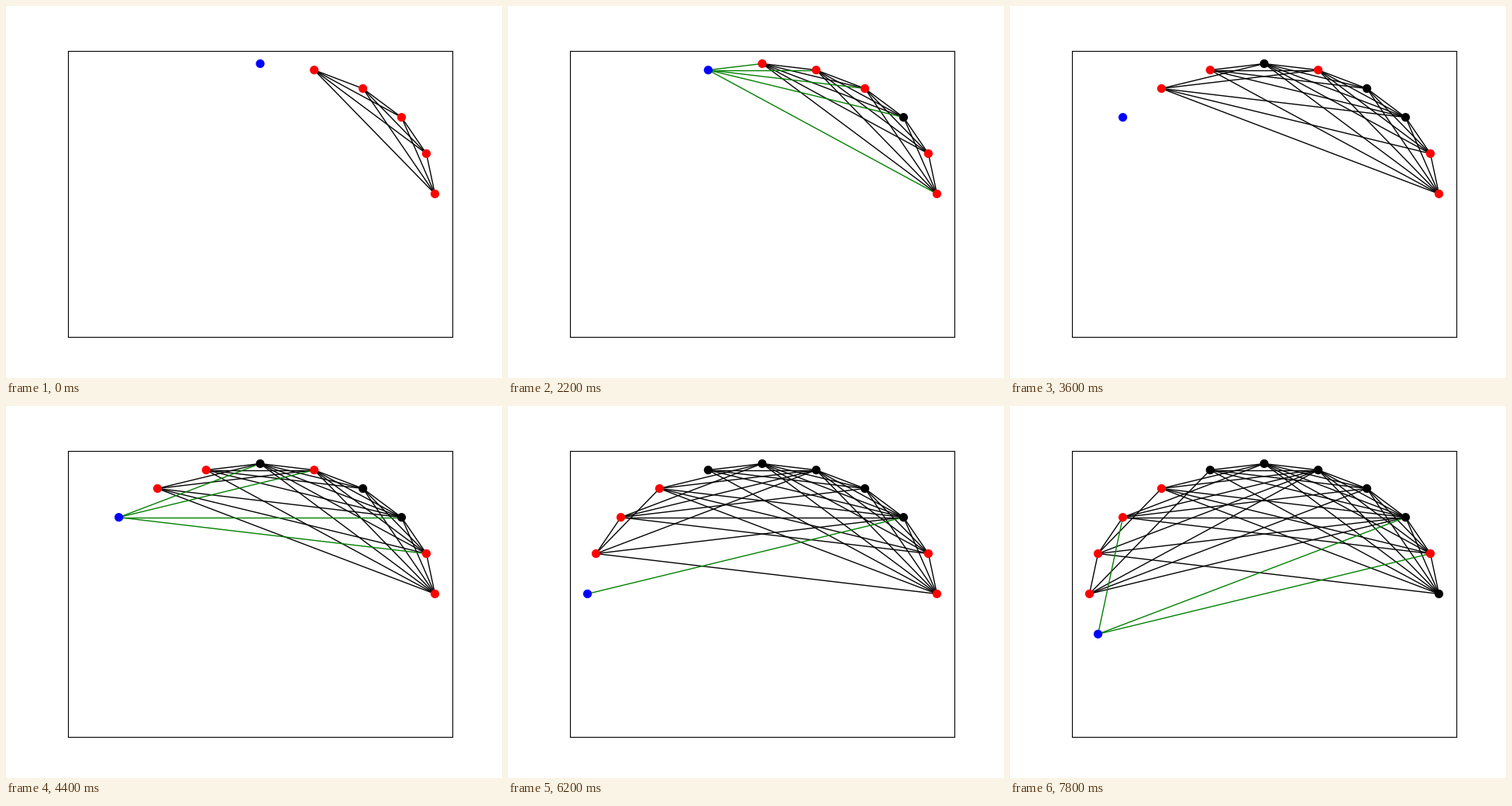
These frames come from a looping animation (640 px wide and 480 px high, 8000 ms). A matplotlib script:

```python
from itertools import combinations

import numpy as np
import matplotlib.pyplot as plt
from matplotlib.animation import FuncAnimation
from matplotlib.collections import LineCollection

SLOTS = 20   # places on the ring
CORE = 5     # nodes fully linked at the start
STEPS = 6    # frames per new node: it appears, then gains five links
FRAMES = 40

# Links of each new node in the order they are drawn
LINKS = {
    5: (0, 1, 2, 3, 4),
    6: (0, 2, 3, 4, 5),
    7: (0, 1, 2, 4, 5),
    8: (1, 2, 4, 5, 3),
    9: (0, 2, 4, 7, 8),
    10: (2, 3, 4, 6, 9),
    11: (1, 2, 8),
}
# One more node turns black each time a new node appears
MARKED = (2, 5, 3, 6, 4, 0)

angle = 2 * np.pi * np.arange(SLOTS) / SLOTS
pos = np.column_stack([np.cos(angle), np.sin(angle)])

fig, ax = plt.subplots(figsize=(6.4, 4.8), dpi=100)
ax.set(xlim=(-1.1, 1.1), ylim=(-1.1, 1.1), xticks=[], yticks=[])

edges = LineCollection([], linewidths=1.0, zorder=1)
ax.add_collection(edges, autolim=False)
nodes = ax.scatter([], [], s=50, linewidths=1.0, zorder=2)


def graph_at(frame):
    """Return the newest node and a dict of edge colours."""
    rounds, count = divmod(frame, STEPS)
    newest = CORE + rounds
    colours = {pair: "k" for pair in combinations(range(CORE), 2)}
    for node in range(CORE, newest):
        colours.update({(old, node): "k" for old in LINKS[node]})
    colours.update({(old, newest): "g" for old in LINKS[newest][:count]})
    return newest, colours


def update(frame):
    newest, colours = graph_at(frame)
    pairs = sorted(colours)
    edges.set_segments([pos[list(pair)] for pair in pairs])
    edges.set_color([colours[pair] for pair in pairs])

    fill = ["r"] * newest + ["b"]
    for node in MARKED[:newest - CORE]:
        fill[node] = "k"
    nodes.set_offsets(pos[:newest + 1])
    nodes.set_facecolor(fill)
    nodes.set_edgecolor(fill)
    return edges, nodes


anim = FuncAnimation(fig, update, frames=FRAMES, interval=200,
                     init_func=lambda: update(0), repeat=True, repeat_delay=0)
plt.show()
```
